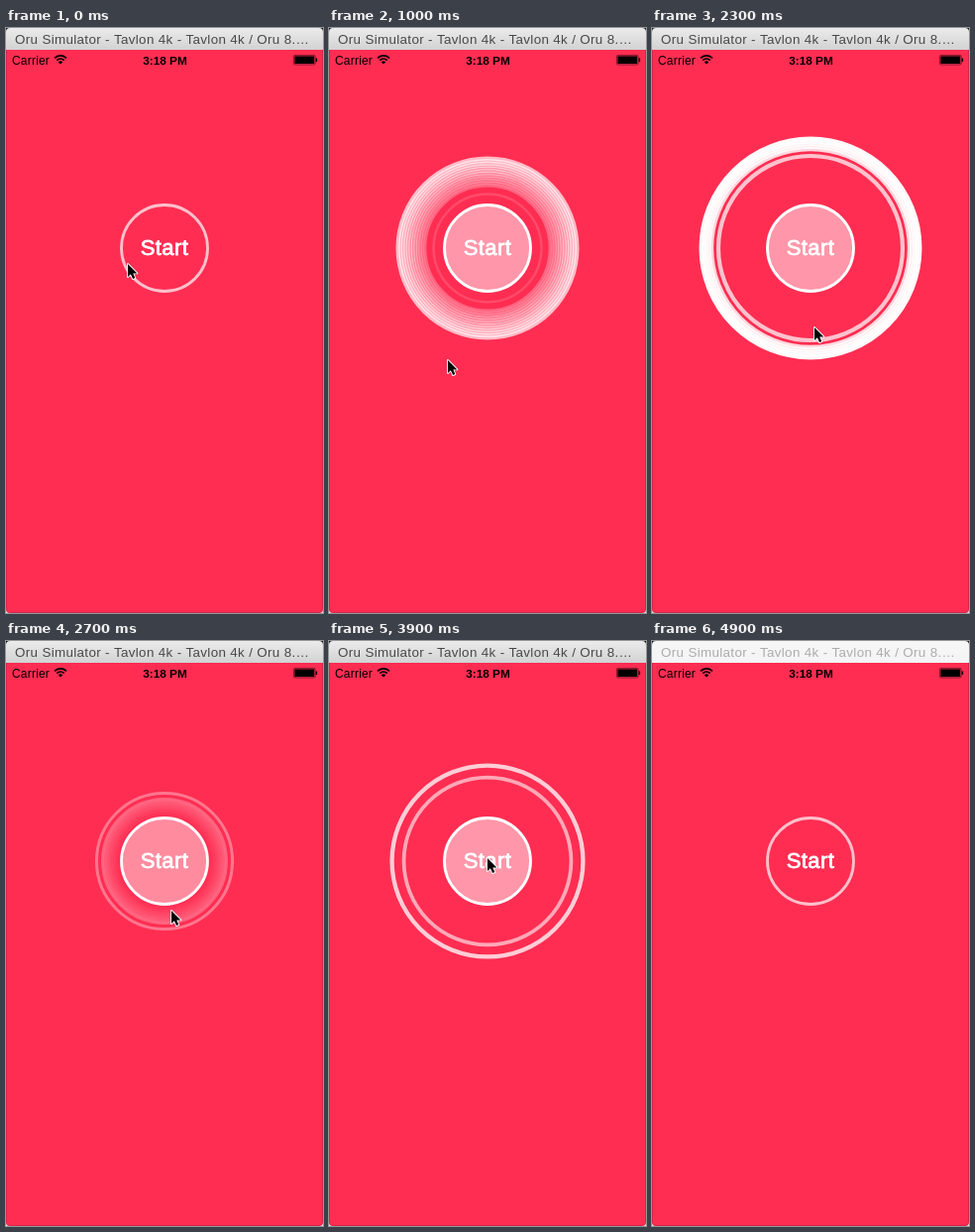
Recreate the animation shown at these times as an HTML page with a canvas. Size 320 by 590 pixels, loop 5000 ms.

```html
<!DOCTYPE html>
<html lang="en">
<head>
<meta charset="utf-8">
<title>Pulse button</title>
<style>
  html, body { margin: 0; width: 100%; height: 100%; overflow: hidden; background: #e4e4e4; }
  canvas { display: block; }
</style>
</head>
<body>
<canvas id="stage" width="320" height="590"></canvas>
<script>
const c = document.getElementById('stage').getContext('2d');
const LOOP = 5000, STEP = 100, SHRINK = 450;
const CX = 160, CY = 222, R = 44.2;
const SANS = '"Liberation Sans", Arial, sans-serif';

const every = (from, to) => {
  const times = [];
  for (let t = from; t <= to; t += 1000 / 60) times.push(t);
  return times;
};
// Moments at which a ring is released
const pulses = [613, ...every(670, 855), ...every(1014, 1050), 2170, ...every(2217, 2370), 2407, 3713, 3793];

// Pointer path: time, x, y
const path = [
  [0, 122, 237], [200, 122, 240], [600, 119, 304], [1000, 119, 334], [1200, 138, 331],
  [1400, 174, 239], [1900, 166, 240], [2300, 163, 301], [2450, 164, 356],
  [2700, 166, 271], [3000, 159, 218], [3900, 159, 218], [4200, 268, 543], [4300, 268, 543]
];

const clamp = v => Math.min(1, Math.max(0, v));
const white = a => `rgba(255,255,255,${a})`;

function text(str, x, y, font, color, align = 'left', spacing = 0) {
  c.font = `${font} ${SANS}`;
  c.fillStyle = color;
  c.textAlign = align;
  c.letterSpacing = spacing + 'px';
  c.fillText(str, x, y);
}

function circle(r, width, color) {
  c.beginPath();
  c.arc(CX, CY, r, 0, 2 * Math.PI);
  c.lineWidth = width;
  c.strokeStyle = color;
  c.stroke();
}

function drawWindow(active) {
  c.fillStyle = '#e4e4e4';
  c.fillRect(0, 0, 320, 590);
  c.fillStyle = '#111';
  c.fillRect(0, 0, 320, 12);
  c.save();
  c.beginPath();
  c.roundRect(0, 0, 320, 590, 4);
  c.clip();
  c.fillStyle = '#ff2d52';
  c.fillRect(0, 22, 320, 568);
  const bar = c.createLinearGradient(0, 0, 0, 22);
  bar.addColorStop(0, active ? '#ebebeb' : '#f7f7f7');
  bar.addColorStop(1, active ? '#d2d2d2' : '#f4f4f4');
  c.fillStyle = bar;
  c.fillRect(0, 0, 320, 22);
  c.restore();
  c.strokeStyle = 'rgba(120,20,50,.3)';
  c.lineWidth = 1;
  c.beginPath();
  c.moveTo(.5, 22);
  c.lineTo(.5, 586);
  c.quadraticCurveTo(.5, 589.5, 4, 589.5);
  c.lineTo(316, 589.5);
  c.quadraticCurveTo(319.5, 589.5, 319.5, 586);
  c.lineTo(319.5, 22);
  c.stroke();
  text('Oru Simulator - Tavlon 4k - Tavlon 4k / Oru 8.…', 9, 16, '13.4px',
    active ? '#484848' : '#acacac', 'left', .34);
}

function drawStatus() {
  text('Carrier', 6, 36.5, '12px', '#000', 'left', .2);
  text('3:18 PM', 160.5, 36.5, 'bold 11.8px', '#000', 'center');
  c.strokeStyle = c.fillStyle = '#000';
  c.lineWidth = 1.7;
  for (const r of [5, 8.2]) {
    c.beginPath();
    c.arc(55, 36, r, -Math.PI * .76, -Math.PI * .24);
    c.stroke();
  }
  c.beginPath();
  c.moveTo(55, 36.5);
  c.arc(55, 36.5, 3, -Math.PI * .76, -Math.PI * .24);
  c.fill();
  c.lineWidth = .5;
  c.beginPath();
  c.roundRect(290.4, 27.4, 21.8, 9.6, 1.5);
  c.stroke();
  c.fillRect(291.4, 28.4, 19.8, 7.6);
  c.fillRect(312.7, 30.5, 1.4, 3.5);
}

function drawButton(t) {
  let glow = 0;
  for (const start of pulses) {
    const age = t - start;
    if (age < 0) continue;
    glow = 1 - clamp((age - 200) / 900);
    const p = 1 - age / SHRINK;
    if (p <= 0) continue;
    const r = 45 + 67.5 * p;
    circle(r, 2 * r / 45, white(p));
  }
  c.beginPath();
  c.arc(CX, CY, R - .7, 0, 2 * Math.PI);
  c.fillStyle = white(.5 * glow);
  c.fill();
  circle(R - .7, 2.8, white(.7 + .3 * glow));
  text('Start', CX, 229.3, '22px', '#fff', 'center', .4);
  c.strokeStyle = '#fff';
  c.lineWidth = .8;
  c.strokeText('Start', CX, 229.3);
}

function drawPointer(t) {
  const i = path.findIndex(k => k[0] > t);
  if (i < 0) return;
  const [t0, x0, y0] = path[i - 1], [t1, x1, y1] = path[i];
  const u = (t - t0) / (t1 - t0);
  c.save();
  c.translate(x0 + (x1 - x0) * u + .5, y0 + (y1 - y0) * u + .5);
  c.scale(.9, .9);
  c.beginPath();
  for (const [x, y] of [[.5, .5], [.5, 15], [3.8, 11.9], [6.2, 17.3], [8.7, 16.2], [6.4, 11], [11, 11]])
    c.lineTo(x, y);
  c.closePath();
  c.lineJoin = 'round';
  c.lineWidth = 2;
  c.strokeStyle = '#fff';
  c.stroke();
  c.fillStyle = '#000';
  c.fill();
  c.restore();
}

function draw(now) {
  const t = Math.floor(now % LOOP / STEP) * STEP;
  drawWindow(t < 4900);
  drawStatus();
  drawButton(t);
  drawPointer(t);
}

let begin;
function tick(now) {
  begin ??= now;
  draw(now - begin);
  requestAnimationFrame(tick);
}
draw(0);
requestAnimationFrame(tick);
</script>
</body>
</html>
```
